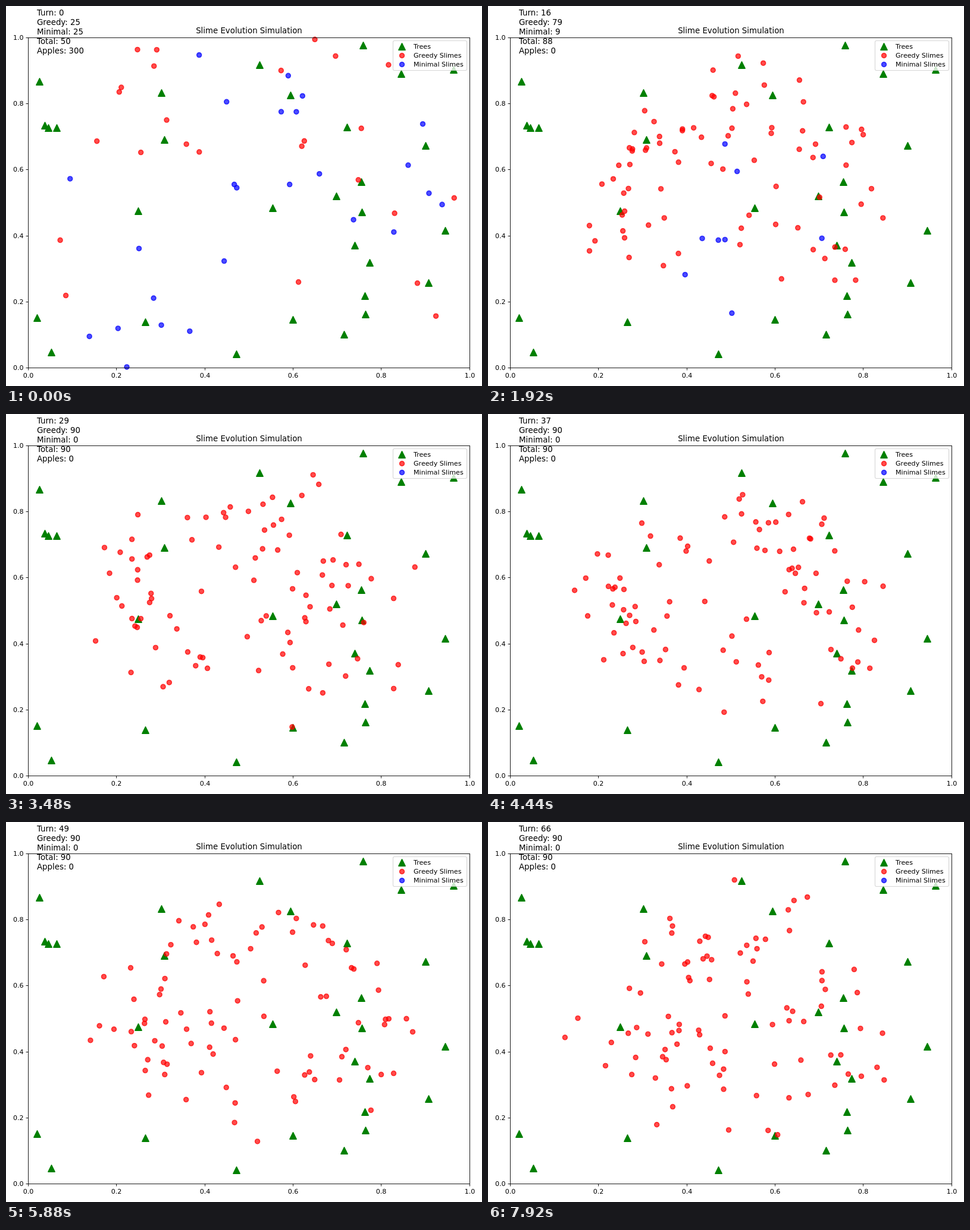
Write an HTML page that moves like this. It is 800 by 640 pixels and loops after 8 s.

```html
<!DOCTYPE html>
<html lang="en">
<head>
<meta charset="utf-8">
<title>Slime Evolution Simulation</title>
<style>
  html, body { margin: 0; width: 100%; height: 100%; overflow: hidden; background: #fff; }
  svg { display: block; width: 800px; height: 640px; font: 11.11px "DejaVu Sans", sans-serif; }
  .large { font-size: 13.33px; white-space: pre; }
  .tree { fill: #008000; stroke: #008000; stroke-width: 1.67; stroke-linejoin: round; }
  .greedy { fill: #f00; stroke: #f00; }
  .minimal { fill: #00f; stroke: #00f; }
  .greedy, .minimal { fill-opacity: .7; stroke-opacity: .7; stroke-width: 1.67; }
  .axis { fill: none; stroke: #000; stroke-width: .89; }
  .box { fill: #fff; fill-opacity: .8; stroke: #ccc; stroke-opacity: .8; stroke-width: 1.1; }
</style>
</head>
<body>
<svg id="stage" viewBox="0 0 800 640"></svg>
<script>
const TURN_MS = 120, LOOP_MS = 8000, LAST_TURN = 66;
const LEFT = 37.5, RIGHT = 779.5, TOP = 53.5, BOTTOM = 609.5;
const MAX_SLIMES = 90, FIRST_SLIMES = 25;
const HERD = { x: 425, y: 335, rx: 205, ry: 160 };

const TREES = [
  [600, 66], [426, 99], [664, 114], [752, 107], [56, 127], [261, 146], [478, 150], [65, 201],
  [71, 205], [85, 205], [266, 225], [573, 204], [705, 235], [597, 296], [555, 320], [222, 345],
  [448, 340], [598, 347], [738, 378], [586, 403], [611, 432], [710, 466], [603, 488], [604, 519],
  [52, 525], [482, 528], [234, 532], [568, 553], [76, 583], [387, 586]];

// Greedy slimes multiply up to the limit and crowd out the minimal ones.
function countsAt(turn) {
  const greedy = Math.min(MAX_SLIMES, Math.round(FIRST_SLIMES + turn * 27 / 8));
  const minimal = Math.max(0, Math.min(FIRST_SLIMES - turn, MAX_SLIMES - greedy));
  return { greedy, minimal, apples: Math.max(0, 300 - turn * 60) };
}

function seeded(seed) {
  return () => {
    seed = (seed + 0x6D2B79F5) | 0;
    let n = Math.imul(seed ^ (seed >>> 15), 1 | seed);
    n = (n + Math.imul(n ^ (n >>> 7), 61 | n)) ^ n;
    return ((n ^ (n >>> 14)) >>> 0) / 4294967296;
  };
}

const random = seeded(29);
const jitter = size => (random() * 2 - 1) * size;
const anywhere = () => [LEFT + random() * (RIGHT - LEFT), TOP + random() * (BOTTOM - TOP)];
const scatter = count => Array.from({ length: count }, anywhere);

// Wander freely inside the herd's ellipse; drift back when outside it.
function step([x, y]) {
  const dx = x - HERD.x, dy = y - HERD.y;
  const reach = Math.hypot(dx / HERD.rx, dy / HERD.ry);
  const scale = reach > 1 ? (1 + (reach - 1) * .85) / reach : 1;
  return [HERD.x + dx * scale + jitter(38), HERD.y + dy * scale + jitter(30)];
}

function advance(slimes, count) {
  const moved = slimes.slice(0, count).map(step);
  while (moved.length < count) {
    const [x, y] = moved[Math.floor(random() * moved.length)];
    moved.push(step([x, y]));
  }
  return moved;
}

const turns = [{ greedy: scatter(FIRST_SLIMES), minimal: scatter(FIRST_SLIMES), counts: countsAt(0) }];
for (let turn = 1; turn <= LAST_TURN; turn++) {
  const counts = countsAt(turn), before = turns[turn - 1];
  turns.push({
    greedy: advance(before.greedy, counts.greedy),
    minimal: advance(before.minimal, counts.minimal),
    counts
  });
}

const stage = document.getElementById("stage");
function add(tag, attrs, text = "") {
  const node = document.createElementNS("http://www.w3.org/2000/svg", tag);
  for (const key in attrs) node.setAttribute(key, attrs[key]);
  node.textContent = text;
  return stage.appendChild(node);
}
const label = (text, x, y, attrs = {}) => add("text", { x, y, ...attrs }, text);
const tree = (x, y) => add("path", { class: "tree", d: `M${x + .5} ${y - 5.05}l5.55 11.1h-11.1z` });
const dot = (kind, x, y) => add("circle", { class: kind, cx: x + .5, cy: y + .5, r: 3.93 });
const pool = (kind, size) => Array.from({ length: size }, () => dot(kind, 0, 0));

TREES.forEach(([x, y]) => tree(x, y));
const dots = { greedy: pool("greedy", MAX_SLIMES), minimal: pool("minimal", FIRST_SLIMES) };

add("rect", { class: "axis", x: LEFT, y: TOP, width: RIGHT - LEFT, height: BOTTOM - TOP });
for (let i = 0; i <= 5; i++) {
  const x = Math.round(37 + 148.35 * i) + .5, y = Math.round(609 - 111.2 * i) + .5;
  const value = (i / 5).toFixed(1);
  add("path", { class: "axis", d: `M${x} ${BOTTOM}v4M${LEFT} ${y}h-4` });
  label(value, x, 626, { "text-anchor": "middle" });
  label(value, 29.7, y + 3.5, { "text-anchor": "end" });
}
label("Slime Evolution Simulation", 408.5, 46, { class: "large", "text-anchor": "middle" });
const info = Array.from({ length: 5 }, (_, i) => label("", 52, 16 + 16 * i, { class: "large" }));

add("rect", { class: "box", x: 650.5, y: 58.5, width: 124, height: 50, rx: 2.2 });
tree(665, 68);
dot("greedy", 665, 83);
dot("minimal", 665, 98);
["Trees", "Greedy Slimes", "Minimal Slimes"].forEach((name, i) => label(name, 685, 72 + i * 15));

function show(turn) {
  const state = turns[turn], { greedy, minimal, apples } = state.counts;
  for (const kind in dots) {
    dots[kind].forEach((node, i) => {
      const place = state[kind][i];
      node.style.display = place ? "" : "none";
      if (!place) return;
      node.setAttribute("cx", place[0]);
      node.setAttribute("cy", place[1]);
    });
  }
  [`Turn: ${turn}`, `Greedy: ${greedy}`, `Minimal: ${minimal}`, `Total: ${greedy + minimal}`, `Apples: ${apples}`]
    .forEach((line, i) => { info[i].textContent = line; });
}

let shown = 0;
show(0);
const start = performance.now();
function tick() {
  const elapsed = (performance.now() - start) % LOOP_MS;
  const turn = Math.min(LAST_TURN, Math.floor(elapsed / TURN_MS));
  if (turn !== shown) show(shown = turn);
  requestAnimationFrame(tick);
}
requestAnimationFrame(tick);
</script>
</body>
</html>
```
